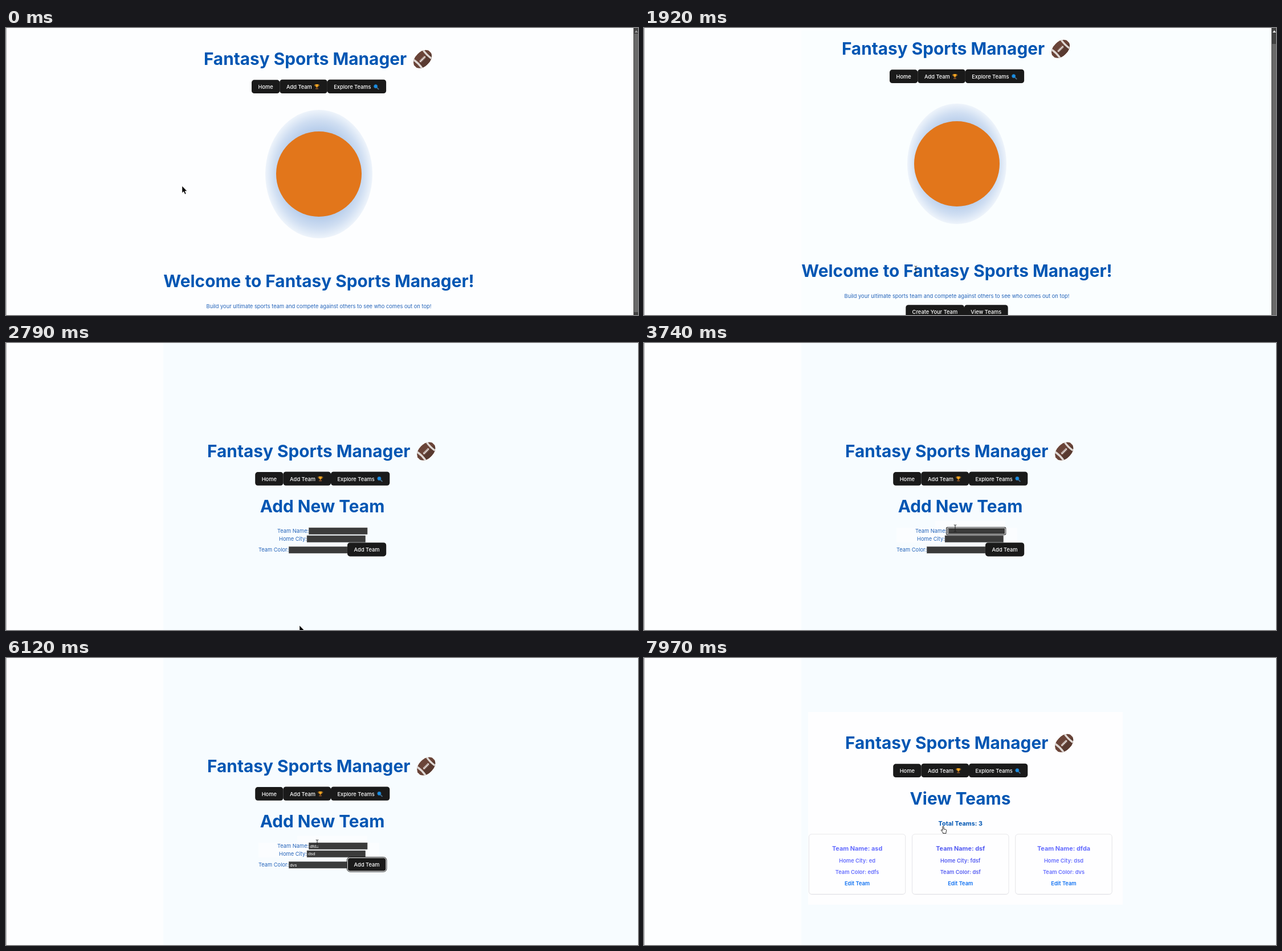
These frames come from a looping animation (1109 px wide and 505 px high, 8 s). An HTML page:

```html
<!DOCTYPE html>
<html lang="en">
<head>
<meta charset="utf-8">
<title>Fantasy Sports Manager</title>
<style>
  html, body { margin: 0; width: 100%; height: 100%; overflow: hidden; background: #fdfeff; }
  svg { display: block; width: 1109px; height: 505px; }
  text { font: 9.32px Inter, sans-serif; font-optical-sizing: none; text-anchor: middle; fill: #0056b3; white-space: pre; }
  .h1 { font-size: 29.8px; font-weight: 700; }
  .h3 { font-size: 10.88px; font-weight: 700; }
  .body { fill: #2363b9; }
  .label { fill: #2363b9; text-anchor: end; }
  .btn { font-weight: 500; fill: #fff; }
  .card { font-weight: 600; }
  .typed { font: 7.77px "Liberation Sans", Arial, sans-serif; text-anchor: start; fill: #fff; }
</style>
</head>
<body>
<svg viewBox="0 0 1109 505" xmlns="http://www.w3.org/2000/svg">
  <defs>
    <radialGradient id="halo">
      <stop offset=".66" stop-color="#b4cbea"/>
      <stop offset=".84" stop-color="#cfdef2"/>
      <stop offset="1" stop-color="#eef4fb"/>
    </radialGradient>
    <clipPath id="ballClip"><path d="M-18.2-3Q-14-12.6 0-12.6T18.2-3V3Q14 12.6 0 12.6T-18.2 3Z"/></clipPath>
    <g id="ball" transform="rotate(-45)">
      <g clip-path="url(#ballClip)">
        <rect x="-20" y="-13" width="40" height="26" fill="#6a4438"/>
        <ellipse cx="3" cy="7" rx="17" ry="6" fill="#593a30"/>
        <path d="M-12.5-13q3 13 0 26M12.5-13q-3 13 0 26" fill="none" stroke="#dfd8d4" stroke-width="3.4"/>
      </g>
      <path d="M-7 0H7M-5-2.2v4.4M-2.5-2.2v4.4M0-2.2v4.4M2.5-2.2v4.4M5-2.2v4.4" stroke="#f3efec" stroke-width="1.1"/>
    </g>
    <g id="cup">
      <path d="M-2.7-4.2H2.7Q2.7 .6 0 1Q-2.7 .6-2.7-4.2Z" fill="#f5a623"/>
      <path d="M-2.6-3.2H-4.2Q-4-.8-2-.5M2.6-3.2H4.2Q4-.8 2-.5" fill="none" stroke="#d98a17" stroke-width=".8"/>
      <path d="M-.6 .8H.6V2.4H-.6Z" fill="#c87a12"/>
      <rect x="-2.4" y="2.2" width="4.8" height="2.2" fill="#7a4a2a"/>
    </g>
    <g id="lens">
      <path d="M1.4 1.4L4 4" stroke="#4a6b86" stroke-width="1.9" stroke-linecap="round"/>
      <circle cx="-1" cy="-1" r="3.1" fill="#1590e8" stroke="#2b6da3" stroke-width=".9"/>
    </g>
    <path id="arrow" d="M0 0V12.2L2.8 9.7L5 14.4L7 13.5L4.9 8.9H8.6Z" fill="#000" stroke="#fff" stroke-width=".5"/>
    <path id="beam" d="M-2.2-6Q0-6 0-5Q0-6 2.2-6M0-5V5M-2.2 6Q0 6 0 5Q0 6 2.2 6" fill="none" stroke="#222"/>
    <path id="hand" d="M3 7V1.1Q3 0 4 0T5 1.1V5L8.4 5.6Q9.8 6 9.7 7.3L9 10.6V12.6H3.6V11L.5 7.6Q0 6.6 1 6.2T3 7.6Z"
      fill="#fff" stroke="#111" stroke-width=".9" stroke-linejoin="round"/>
  </defs>
  <rect width="1109" height="505" fill="#fdfeff"/>
  <rect id="tint" x="276" width="833" height="505"/>
  <g id="home"></g>
  <g id="form"></g>
  <g id="teams"></g>
  <g id="bar">
    <rect x="1101" width="8" height="505" fill="#424242"/>
    <rect id="thumb" x="1102" width="7" fill="#696969"/>
    <path id="tip" d="M1103 8L1106 4L1109 8Z"/>
  </g>
  <rect width="1" height="505" fill="#a9abad"/>
  <use id="cursor"/>
</svg>
<script>
const $ = id => document.getElementById(id);
const set = (id, attrs) => { for (const k in attrs) $(id).setAttribute(k, attrs[k]); };
const show = (id, on) => set(id, { display: on ? 'inline' : 'none' });
const at = (keys, t) => keys.filter(k => k[0] <= t).pop();

const text = (cls, x, y, s, extra = '') => `<text class="${cls}" x="${x}" y="${y}" ${extra}>${s}</text>`;
const box = (x, y, w, h, r, fill, extra = '') =>
  `<rect x="${x}" y="${y}" width="${w}" height="${h}" rx="${r}" fill="${fill}" ${extra}/>`;
const button = (x, y, w, h, label, mid = x + w / 2, id = '') =>
  box(x, y, w, h, 4.7, '#1a1a1a', id && `id="${id}"`) + text('btn', mid, y + h - 8.1, label);
const icon = (name, x, y) => `<use href="#${name}" x="${x}" y="${y}"/>`;

// Title and navigation, laid out for the home page
const header = (dx, dy) => `<g transform="translate(${dx} ${dy})">
  ${text('h1', 525, 65, 'Fantasy Sports Manager')}
  <g transform="translate(731 54.8)"><use href="#ball"/></g>
  ${button(431, 91.3, 49.3, 23.8, 'Home')}
  ${button(480.2, 90.7, 83.7, 24.4, 'Add Team', 514.4)}${icon('cup', 545.5, 103.3)}
  ${button(563.8, 90.7, 103.3, 24.4, 'Explore Teams', 607.9)}${icon('lens', 649.7, 103.7)}</g>`;

$('home').innerHTML = header(0, 0) +
  '<ellipse id="glow" cx="549" cy="257" fill="url(#halo)"/>' +
  '<circle cx="549" cy="257" r="75" fill="#e2761b"/>' +
  text('h1', 549, 456.1, 'Welcome to Fantasy Sports Manager!') +
  text('body', 549, 492.5, 'Build your ultimate sports team and compete against others to see who comes out on top!') +
  button(459.3, 505.2, 102.7, 24, 'Create Your Team', 510.4, 'create') +
  button(562, 505.2, 76.7, 24, 'View Teams');

// label, baseline, input x, input y, typing steps
const fields = [
  ['Team Name:', 333.7, 531.3, 325, [[0, ''], [4170, 'd'], [4300, 'df'], [4440, 'dfd'], [4570, 'dfda']]],
  ['Home City:', 347.6, 528, 338.9, [[0, ''], [5000, 'ds'], [5150, 'dsd']]],
  ['Team Color:', 366.8, 496.2, 358.2, [[0, ''], [5710, 'dvs']]]
];
$('form').innerHTML =
  '<path id="wash" fill="#fbfdff" d="M443 325H655V351H443ZM511 313H634V325H511Z"/>' +
  header(6.2, 135.7) + text('h1', 555, 298, 'Add New Team') +
  fields.map(([label, base, x, y], i) => box(x, y, 102.8, 11.8, 0, '#3b3b3b', 'stroke="#767676" stroke-width=".4"') +
    text('label', x, base, label) + text('typed', x + 2, base - .2, '', `id="typed${i}"`)).join('') +
  button(599, 351.2, 68.2, 24.2, 'Add Team') +
  `<rect id="caret" width=".8" height="8.6" fill="#fff"/>
   <g id="ring" fill="none"><rect id="ringOut" stroke="#101010"/><rect id="ringIn" stroke="#fff"/></g>`;

const cards = [['asd', 'ed', 'edfs'], ['dsf', 'fdsf', 'dsf'], ['dfda', 'dsd', 'dvs']];
const card = ([name, city, color], i) => {
  const x = 289.4 + i * 181.2, mid = x + 84.7;
  const ink = `style="fill:${i === 1 ? '#535bf2' : '#646cff'}"`;
  return box(x, 310.8, 169.4, 105.6, 4.7, '#ececf0') +
    box(x, 310, 169.4, 105.6, 4.7, '#fefeff', 'stroke="#dcdce0" stroke-width=".7"') +
    text('h3', mid, 339.4, 'Team Name: ' + name, ink) +
    text('card', mid, 360.3, 'Home City: ' + city, ink) +
    text('card', mid, 380.2, 'Team Color: ' + color, ink) +
    text('card', mid, 399.9, 'Edit Team', 'style="fill:#0d70f2"');
};
$('teams').innerHTML = box(288, 95, 552, 339, 0, '#fefeff', 'id="sheet"') + '<g id="list">' +
  header(6.2, 95) + text('h1', 555, 257.5, 'View Teams') + text('h3', 555.3, 294.8, '', 'id="total"') +
  `<g id="cards">${cards.map(card).join('')}</g></g>`;

const cursorKeys = [
  [0, 'arrow', 309, 278], [1680, 'arrow', 425, 331], [1800, 'arrow', 438, 361], [1920, 'beam', 477, 425],
  [2070, 'beam', 479, 425], [2220, 'arrow', 492, 458], [2340, 'hand', 506, 483], [2490, 'hand', 509, 489],
  [2640, 'hand', 511, 497], [2790, 'arrow', 515, 497], [3220, 'arrow', 516, 400], [3340, 'arrow', 522, 320],
  [3460, 'arrow', 532, 313], [3610, 'beam', 546, 326], [7260, 'hand', 542, 324.5], [7970, 'hand', 521, 296]
];
const glowKeys = [[0, 94], [1680, 92.5], [1800, 90.5], [1920, 87], [2070, 80], [2220, 76], [2340, 0]];
const focusKeys = [[0, -1], [3740, 0], [4570, 1], [5280, 2], [6120, 3], [6990, -1]];

function drawHome(t) {
  const scrolled = t >= 710;
  const glow = at(glowKeys, t)[1];
  set('home', { transform: `translate(0 ${scrolled ? -18 : 0})` });
  set('glow', { rx: glow, ry: glow && glow + 19 });
  set('create', { stroke: t >= 2490 ? '#646cff' : 'none', 'stroke-width': .7 });
  set('thumb', scrolled ? { y: 28, height: 477 } : { y: 10, height: 490 });
  set('tip', { fill: scrolled ? '#eee' : '#999' });
}

function drawForm(t) {
  fields.forEach((f, i) => { $('typed' + i).textContent = at(f[4], t)[1]; });
  show('wash', t >= 3610);
  const focus = at(focusKeys, t)[1];
  show('ring', focus >= 0);
  show('caret', focus >= 0 && focus < 3);
  if (focus < 0) return;
  const isButton = focus === 3;
  const [x, y, w, h] = isButton ? [599, 351.2, 68.2, 24.2] : [fields[focus][2], fields[focus][3], 102.8, 11.8];
  const ring = (id, d) => set(id, { x: x - d, y: y - d, width: w + 2 * d, height: h + 2 * d, rx: isButton ? 4.7 + d : 1.5 });
  ring('ringOut', .7);
  ring('ringIn', -.3);
  if (!isButton) set('caret', { x: x + 2.2 + $('typed' + focus).getComputedTextLength(), y: y + 1.7 });
}

function drawTeams(t) {
  const loaded = t >= 7260;
  show('sheet', loaded);
  show('cards', loaded);
  set('list', { transform: `translate(0 ${loaded ? 0 : 53})` });
  $('total').textContent = 'Total Teams: ' + (loaded ? cards.length : 0);
}

function draw(t) {
  const page = t < 2790 ? 'home' : t < 7110 ? 'form' : 'teams';
  for (const id of ['home', 'form', 'teams']) show(id, id === page);
  show('bar', page === 'home');
  set('tint', { y: page === 'home' ? 4 : 0, fill: t < 710 ? '#fdfeff' : page === 'home' ? '#fafeff' : '#f7fcff' });
  ({ home: drawHome, form: drawForm, teams: drawTeams })[page](t);
  const [, kind, x, y] = at(cursorKeys, t);
  set('cursor', { href: '#' + kind, x, y });
}

const start = performance.now();
function tick() {
  draw((performance.now() - start) % 8000);
  requestAnimationFrame(tick);
}
tick();
</script>
</body>
</html>
```
